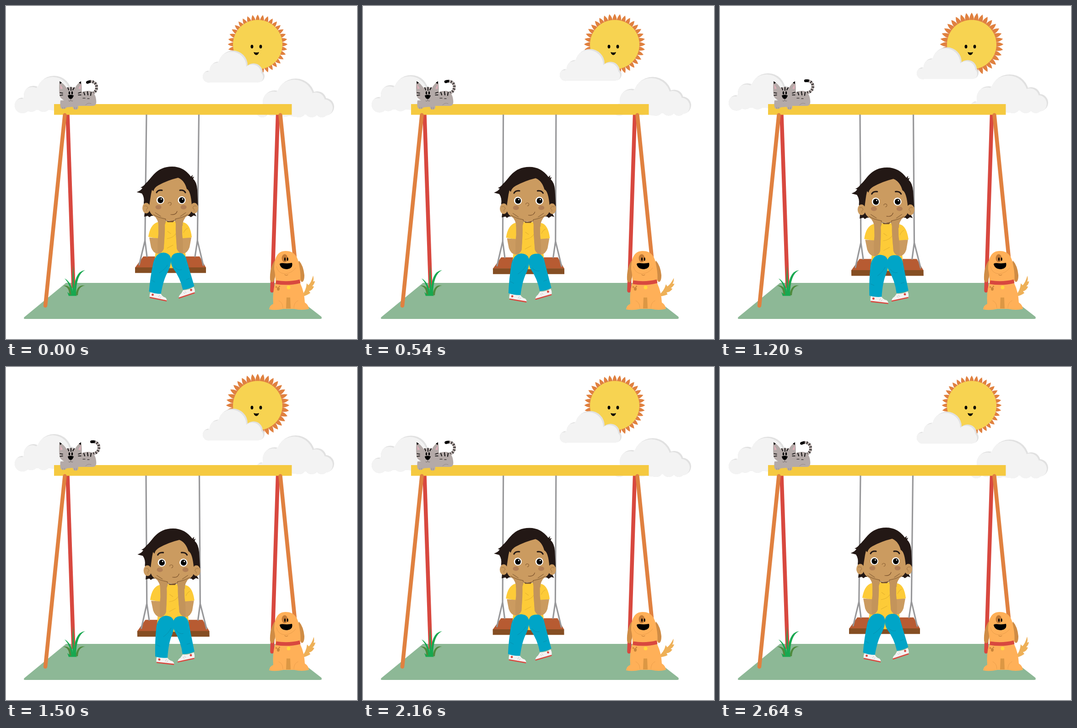
Write an HTML page with a canvas that moves like this. It is 767 px wide and 730 px high and loops after 2.7 s.

```html
<!DOCTYPE html>
<html lang="en">
<head>
<meta charset="utf-8">
<title>Swing in the park</title>
<style>
  html, body { margin: 0; width: 100%; height: 100%; overflow: hidden; background: #fff; }
  canvas { display: block; }
</style>
</head>
<body>
<canvas id="stage" width="767" height="730"></canvas>
<script>
const ctx = document.getElementById('stage').getContext('2d');
const LOOP = 2700, STEP = 60, DEG = Math.PI / 180;
const SKIN = '#cb9b60', SKIN_DARK = '#c3945b', HAIR = '#231815', INK = '#000';
const FUR = '#b4aaa8', COAT = '#ffb058', BROWN = '#cf8c45', RED = '#d8483f', ORANGE = '#e08140';

// 0 to 1 to 0, reaching 1 at the peak time
const wave = (t, peak, period = LOOP) => (1 + Math.cos((t - peak) / period * 2 * Math.PI)) / 2;

function fill(d, color) {
  ctx.fillStyle = color;
  ctx.fill(new Path2D(d));
}

function stroke(d, color, width, cap = 'round') {
  ctx.strokeStyle = color;
  ctx.lineWidth = width;
  ctx.lineCap = cap;
  ctx.lineJoin = 'round';
  ctx.stroke(new Path2D(d));
}

function oval(x, y, rx, ry, color, angle = 0) {
  ctx.fillStyle = color;
  ctx.beginPath();
  ctx.ellipse(x, y, rx, ry, angle * DEG, 0, 2 * Math.PI);
  ctx.fill();
}

function group(draw) {
  ctx.save();
  draw();
  ctx.restore();
}

function turned(x, y, angle, draw) {
  group(() => {
    ctx.translate(x, y);
    ctx.rotate(angle * DEG);
    ctx.translate(-x, -y);
    draw();
  });
}

// Draws a shape and its mirror image about a vertical line
function mirrored(axis, draw) {
  draw();
  group(() => {
    ctx.translate(2 * axis, 0);
    ctx.scale(-1, 1);
    draw();
  });
}

function cloud(puffs, base, dy) {
  const path = new Path2D(base);
  for (const [x, y, r] of puffs) {
    path.moveTo(x + r, y);
    path.arc(x, y, r, 0, 2 * Math.PI);
  }
  group(() => {
    ctx.translate(0, dy);
    ctx.fillStyle = '#e1e1e1';
    ctx.fill(path);
    ctx.clip(path);
    ctx.translate(-3, 2.5);
    ctx.fillStyle = '#f3f3f3';
    ctx.fill(path);
    ctx.fillRect(430, 160, 130, 10);
  });
}

const LEFT_CLOUD = [[36, 218, 17], [60, 196, 21], [105, 191, 38], [138, 205, 25], [55, 217, 15], [82, 216, 16]];
const MID_CLOUD = [[443, 155, 13], [465, 142, 20], [496, 130, 32], [541, 146, 20], [552, 154, 13]];
const RIGHT_CLOUD = [[633, 201, 42], [587, 211, 26], [560, 231, 13], [680, 207, 20], [698, 221, 19],
  [582, 229, 12], [610, 228, 15], [640, 228, 16], [668, 229, 15], [690, 231, 13]];

function sun(t) {
  const size = 1 + 0.064 * wave(t, 1290);
  group(() => {
    ctx.translate(550, 84);
    ctx.scale(size, size);
    for (let i = 0; i < 36; i++) {
      fill('M-4.3 -48 Q-5.6 -57 0 -65.3 Q5.6 -57 4.3 -48Z', ORANGE);
      ctx.rotate(10 * DEG);
    }
  });
  oval(550, 84.5, 54, 54, '#f7d351');
  oval(537.5, 89, 2.9, 4, INK);
  oval(556.5, 89, 2.9, 4, INK);
  fill('M541 101 Q547 103 553 101 Q551 107 547 107.5 Q543 107 541 101Z', INK);
}

function frame() {
  stroke('M134.5 238 L147.5 618', RED, 8.5, 'butt');
  stroke('M594 238 L581.5 624', RED, 8.5);
  fill('M105 215 H624.5 V238.5 H105Z', '#f5c940');
  stroke('M128.5 239 L86 657', ORANGE, 8.5);
  stroke('M599.5 239 L638 620', ORANGE, 8.5);
}

function grass() {
  fill('M138 634 Q139 616 125 613 Q144 611 143 634Z', '#4f8a3e');
  fill('M152 634 Q155 609 173 613 Q158 614 157 634Z', '#4f8a3e');
  fill('M143 634 Q141 611 128 597 Q145 607 147 634Z', '#18a850');
  fill('M146 634 Q144 595 147 568 Q148 598 150 634Z', '#18a850');
  fill('M149 634 Q147 582 173 579 Q153 588 153 634Z', '#18a850');
  fill('M134 627 L141 633 L151 633 L156 635.5 H137Z', '#18a850');
}

function cat(t) {
  turned(193, 192, 20 * wave(t, 1380), () => {
    const tail = 'M190 191 C198 187 200 178 196 171 C192 165 184 164 178 167.5';
    stroke(tail, FUR, 6);
    ctx.setLineDash([1.5, 4.5]);
    stroke(tail, INK, 6, 'butt');
    ctx.setLineDash([]);
    stroke('M178 167.5 L182 166', INK, 6);
  });
  fill('M155 196 Q166 185 181 186 Q195 187 197 206 Q199 219 189 219 H140 L138 205Z', FUR);
  stroke('M170 189 L172 195 M178 188 L179 195 M186 189 L185 196', INK, 1.8);
  stroke('M168 202 H173 M178 203 H182', INK, 1.2);
  stroke('M174 217 Q179 211 186 214', '#938987', 1);
  fill('M119 207 Q117 223 122 225 Q128 227 133 222 L146 221 Q147 227 152 227 Q158 227 158 221 L154 206Z', FUR);
  stroke('M124 222 V225 M128 222 V225 M150 222 V226 M154 222 V226', '#938987', 1);
  fill('M117 165 Q125 169 132 179 Q141 177 151 179 Q156 170 164 165 Q167 178 165 196 Q163 207 142 212 Q120 207 117 196 Q115 178 117 165Z', FUR);
  fill('M118.5 171 L124 181 L119 182Z M163.5 171 L158 181 L163 182Z', '#dfafb9');
  fill('M117 165 L122 168 L118 171Z M164 165 L159 168 L163.5 171Z', INK);
  stroke('M135 179 L137 184 M142 178 V185 M149 179 L146 184', INK, 1.8);
  stroke('M118 190 L124 191 M118 196 L124 195 M164 189 L158 191 M164 195 L158 195', INK, 1.4);
  oval(138.5, 190.5, 1.7, 3.4, INK);
  oval(144.5, 190.5, 1.7, 3.4, INK);
  fill('M135 196 Q141 193 148 196 Q146 203 141.5 204 Q136 203 135 196Z', INK);
  stroke('M141.5 204 V207 Q139 210 137 208 M141.5 207 Q144 210 146 208', '#625957', 0.8);
}

function dog(t) {
  turned(650, 633, 12.5 * wave(t, 640, LOOP / 2), () => {
    fill('M645 636 Q656 625 657 608 L661 612 Q667 606 671 591 Q673 598 671 604 L675 603 Q674 610 669 614 L673 615 Q669 624 662 625 L665 629 Q657 635 647 637Z', '#eeb057');
  });
  fill('M588 608 Q582 628 584 653 Q576 656 575 665 Q589 668 606 664 H630 Q646 668 662 664 Q661 655 653 650 Q652 627 643 608Z', COAT);
  fill('M613 639 H621 L622 663 H612Z', '#dc9744');
  stroke('M596 646 Q605 650 605 662 M638 646 Q629 650 629 662', '#eda04c', 1);
  fill('M587 558 Q576 574 577 600 Q579 609 585 604 Q591 590 590 566Z', BROWN);
  fill('M640 558 Q650 569 652 590 Q652 605 646 605 Q639 598 637 570Z', BROWN);
  fill('M586 577 C586 552 593 537 611 537 C630 537 638 549 641 570 Q645 590 643 607 Q616 615 589 608 Q589 590 586 577Z', COAT);
  oval(609, 553, 6.5, 9, '#c27a35');
  oval(609.5, 555, 1.5, 3.8, INK);
  oval(615.3, 555, 1.5, 3.8, INK);
  fill('M598 566 Q598 563 605 563.5 Q616 565 625 563 Q628 575 614 577 Q601 577 598 566Z', INK);
  stroke('M591 571 Q594 586 609 587 Q625 586 633 574', '#e79b49', 0.9);
  stroke('M609 589 Q613 592 616 589', '#b8722f', 1);
  stroke('M590 605.5 Q616 610 642.5 603.5', RED, 8, 'butt');
  oval(617.5, 617, 4, 4, '#ffd83f');
  oval(595, 620, 3, 4, '#c98439');
  oval(590.5, 616, 1.6, 2, '#c98439');
  oval(597.5, 614.5, 1.6, 1.6, '#c98439');
}

function seat() {
  fill('M300 549 H423 L437 573.5 H282Z', '#b75b32');
  fill('M282 573 H437 V585.3 H282Z', '#854e23');
  for (const d of ['M307 236 L303.7 514 M303.7 514 L291 567 M303.7 514 L308 549',
                   'M421.5 236 L418.3 514 M418.3 514 L413 549 M418.3 514 L431 568']) {
    stroke(d, '#98989a', 3.2);
  }
}

function legs(p) {
  turned(377, 548, 6.5 * p, () => {
    fill('M387 623 Q399 623 410 616 Q414 622 412 630 L378 641 Q376 636 383 630Z', '#f4f2f2');
    stroke('M378.5 640 L411.5 629', RED, 2.6);
    stroke('M388 628 L391 631 M391 626 L394 629', '#b9b5b5', 0.8);
    oval(404.5, 622.5, 2.4, 2.4, RED);
    fill('M360 556 Q362 541 378 541 Q390 541 394 555 Q400 576 411.5 614 Q399 621 386.5 622 Q381 596 364 573 Q360 565 360 556Z', '#00a5c7');
    stroke('M368 572 Q376 581 384 578 M394 600 L401 597', '#078fad', 0.9);
  });
  turned(339, 548, -5.4 * p, () => {
    fill('M316 627 Q327 631 338 630 Q341 637 348 639 Q352 642 351 647 L314 639 Q313 632 316 627Z', '#f4f2f2');
    stroke('M315 639 L350 646.3', RED, 2.6);
    stroke('M336 634 L333 638 M339 637 L336 640', '#b9b5b5', 0.8);
    oval(320.5, 633, 2.4, 2.4, RED);
    fill('M322 562 Q328 541 344 540.5 Q360 542 360.5 556 Q361 567 354 582 Q344 599 338.5 631 Q324 631 312.5 626 Q315 594 322 562Z', '#00a5c7');
    stroke('M335 585 Q347 578 353 568 M318 601 L325 605', '#078fad', 0.9);
  });
}

function body() {
  fill('M331 474 Q343 471 350 472 L369 472 Q379 471 390 475 Q403 480 406 507 L392 510 Q391 535 394 572 Q359 578 323 571 Q328 540 327 509 L311 506 Q315 479 331 474Z', '#fdcb38');
  stroke('M352 510 Q366 508 371 499 M353 494 L360 499 M397 487 Q391 490 388 497 M352 531 L365 524', '#e5b22e', 1);
  mirrored(359, () => {
    fill('M313 507.5 L331 509 L346 508 L345 532 Q340 543 331 543 Q321 541 317 529Z', SKIN);
    fill('M333 478 L347 476 Q348 500 344 534 Q339 543 332 543 Q330 524 333 500Z', SKIN_DARK);
  });
}

function head() {
  // Hair behind the face
  fill('M297 411 L285.5 408 Q296 404 298 399 L294 398 Q301 395 305 389 C318 379 327 352 363 352 Q388 352 404 374 L408 370 L407 376 L411 374 L409 379 Q417 386 418 403 L419.5 437 L410 450 L416 461 L410 459 L404 463 L400 460 H318 L313 463 L310 460 L302 462 L304 444 L301 432 Q303 420 297 411Z', HAIR);
  mirrored(359, () => {
    oval(306.5, 443, 8.5, 11.5, SKIN);
    stroke('M302 439 Q308 436 310 443 Q306 445 307 449', '#a67a47', 1);
  });
  fill('M313 438 Q315 424 317 412 L319 403 L322 406 Q324 398 333 393 Q353 382 376 376.5 Q390 382 395 401 Q404 405 406 438 Q410 455 389 464 Q375 472 359 471 Q338 471 322 460 Q311 452 313 438Z', SKIN);
  fill('M350 470 Q359 473 369 469 L365 474 H353Z', '#79542f');

  mirrored(360.5, () => {
    stroke('M329 409 Q332 403 341 404', HAIR, 3);
    oval(333, 441, 6.5, 4.8, '#b27f55');
  });
  for (const x of [337.3, 384]) {
    oval(x, 425.5, 8.6, 8.6, '#fff');
    oval(x + 0.3, 425.7, 6.2, 6.5, INK);
    oval(x + 2, 423, 1.4, 1.6, '#fff');
  }
  stroke('M354 433 Q357 428 361 432 Q362 436 358 437', '#8d6336', 1.1);
  stroke('M360 457 Q371 459 374 450', '#744c28', 1.1);

  mirrored(359.5, () => {
    fill('M322 457 Q325 455 332 461 L325 452 Q330 453 339 461 L349 466 Q351 470 347 480 L333 482 Q334 470 322 457Z', SKIN_DARK);
    stroke('M322 457 Q331 464 349 467 M326 453 L338 461 M348 467 L350 471', '#76522e', 0.9);
  });
}

// The swing grows and leans as it comes nearer
function swing(t) {
  const p = wave(t, 1320), scale = 1 + 0.018 * p, lean = 0.0193 * p;
  group(() => {
    ctx.beginPath();
    ctx.rect(0, 238, 767, 492);
    ctx.clip();
    ctx.transform(scale, 0, lean, scale, 364 * (1 - scale) - 238 * lean, 238 * (1 - scale));
    seat();
    body();
    legs(p);
    head();
  });
}

function draw(now) {
  const t = Math.floor((now % LOOP) / STEP) * STEP;
  ctx.fillStyle = '#fff';
  ctx.fillRect(0, 0, 767, 730);
  sun(t);
  cloud(MID_CLOUD, 'M443 145 H552 V167.5 H441Z', -7.5 * wave(t, 1220));
  cloud(LEFT_CLOUD, 'M60 190 H140 V228 H60Z', -6 * wave(t, 1420));
  cloud(RIGHT_CLOUD, 'M575 205 H695 V238 H575Z', -9.3 * wave(t, 1320));
  fill('M131 607 H594 L689 681 Q692 686 686 686 H42 Q37 686 40 682Z', '#8db896');
  frame();
  grass();
  cat(t);
  swing(t);
  dog(t);
}

const start = performance.now();
function tick() {
  draw(performance.now() - start);
  requestAnimationFrame(tick);
}
tick();
</script>
</body>
</html>
```
